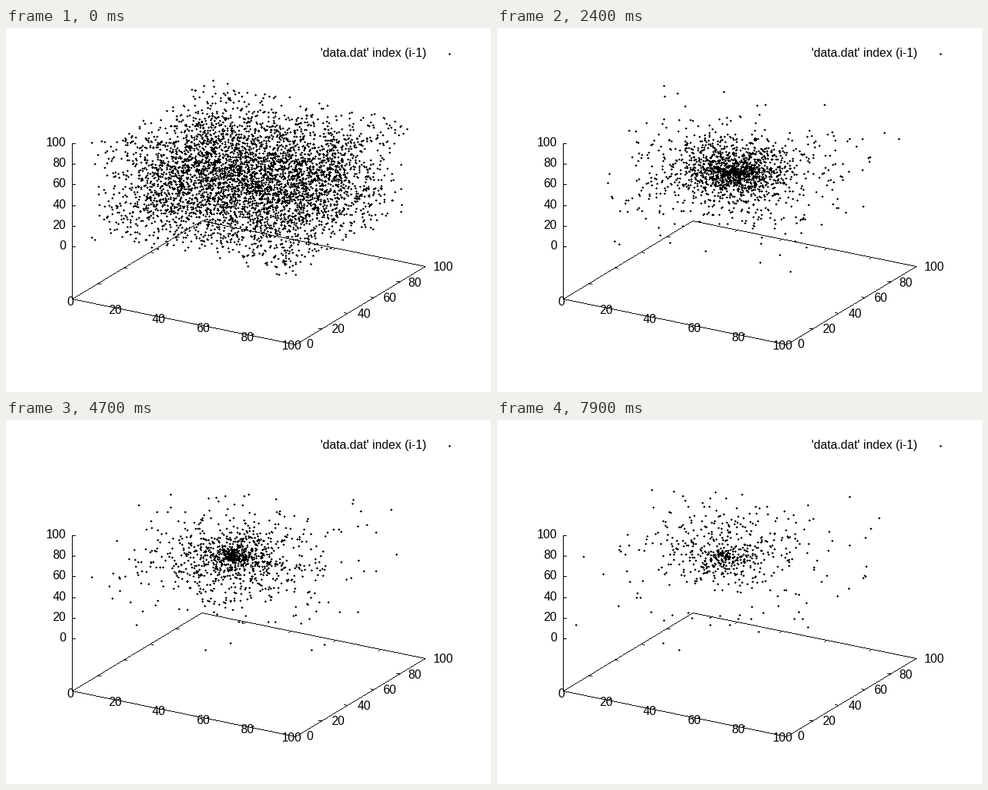
These frames come from a looping animation (640x480 px, 8 s). A matplotlib script:

```python
import numpy as np
import matplotlib.pyplot as plt
from matplotlib.animation import FuncAnimation

W, H, DPI = 640, 480, 100
PX = 72 / DPI
FRAMES, INTERVAL = 80, 100
COUNT = 4600

plt.rcParams["font.family"] = "Liberation Sans"
fig = plt.figure(figsize=(W / DPI, H / DPI), dpi=DPI, facecolor="white")
ax = fig.add_axes([0, 0, 1, 1])
ax.set(xlim=(0, W), ylim=(H, 0))
ax.axis("off")

# Screen vectors for one data unit along x, y and z
ORIGIN = np.array([87, 288])
BASIS = np.array([[2.95, 0.60], [1.71, -1.03], [0, -1.36]])
FLOOR = -69 / 1.36
DRIFT = np.array([-6.8, 0, 11.7])

backdrop = np.zeros((H, W, 4), np.uint8)


def project(p):
    return ORIGIN + np.asarray(p) @ BASIS


def line(a, b):
    """One-pixel line without smoothing."""
    steps = int(np.ceil(np.abs(b - a).max()))
    x, y = np.rint(np.linspace(a, b, steps + 1)).astype(int).T
    backdrop[y, x, 3] = 255


def label(x, y, text, ha):
    ax.text(x, y + 5.5, text, ha=ha, va="baseline", size=16 * PX)


def draw_axes():
    corners = [project((x, y, FLOOR))
               for x, y in ((0, 0), (100, 0), (100, 100), (0, 100))]
    for a, b in zip(corners, corners[1:] + corners[:1]):
        line(a, b)
    line(project((0, 0, 100)), corners[0])

    x_tick, y_tick = np.array([3.4, -2]), np.array([4, 0.8])
    for k in range(6):
        v = 20 * k
        z = project((0, 0, v))
        line(z, z + (4, 0))
        label(79, z[1] - 1.5, str(v), "right")
        label(85.3 + 58.3 * k, 360 + 11.8 * k, str(v), "center")
        label(396 + 33.6 * k, 417 - 20.4 * k, str(v), "left")
        if 0 < v < 100:
            for edge, sign in ((0, 1), (100, -1)):
                a = project((v, edge, FLOOR))
                line(a, a + sign * x_tick)
                a = project((edge, v, FLOOR))
                line(a, a + sign * y_tick)
    label(555, 32.5, "'data.dat' index (i-1)", "right")


# A cube whose faces already sag inwards; each body then swings through
# the centre on its own period while orbiting it
rng = np.random.default_rng(7)
start = rng.uniform(-50, 50, (COUNT, 3))
start *= 0.77 + 0.18 * (start ** 2).sum(axis=1, keepdims=True) / 7500
size = 6 * rng.gamma(1.3, 0.8, (COUNT, 1))
orbit_a = size * rng.normal(size=(COUNT, 3))
orbit_b = size * rng.normal(size=(COUNT, 3))
rate = np.clip(1 + 0.15 * rng.standard_t(2, (COUNT, 1)), 0.1, 2.2)
bound = rng.gamma(1.5, 0.37, (COUNT, 1))


def bodies(t):
    alive = int(1900 - 160 * t + 2700 * np.exp(-(t / 1.5) ** 2))
    s = np.clip((t - 0.9) / 1.3, 0, 1)
    swing = 1 + (bound - 1) * s * s * (3 - 2 * s)
    spread = 2.6 * (1 - np.exp(-t / 2.5))
    drift = 1 - np.exp(-(t / 3) ** 2)
    turn = 1.3 * rate * t
    p = (50 + DRIFT * drift + start * swing * np.cos(rate * t)
         + spread * (orbit_a * np.cos(turn) + orbit_b * np.sin(turn)))[:alive]
    return p[(np.abs(p - 50) <= 50).all(axis=1)]


def picture(t):
    img = backdrop.copy()
    spots = np.vstack([project(bodies(t)), [585, 34]])
    x, y = np.rint(spots).astype(int).T
    for dx, dy in ((0, 0), (1, 0), (-1, 0), (0, 1), (0, -1)):
        img[y + dy, x + dx, 3] = 255
    return img


draw_axes()
layer = fig.figimage(picture(0), origin="upper")


def update(i):
    layer.set_data(picture(i * INTERVAL / 1000))
    return [layer]


anim = FuncAnimation(fig, update, frames=FRAMES, interval=INTERVAL,
                     repeat=True, repeat_delay=0)
plt.show()
```
